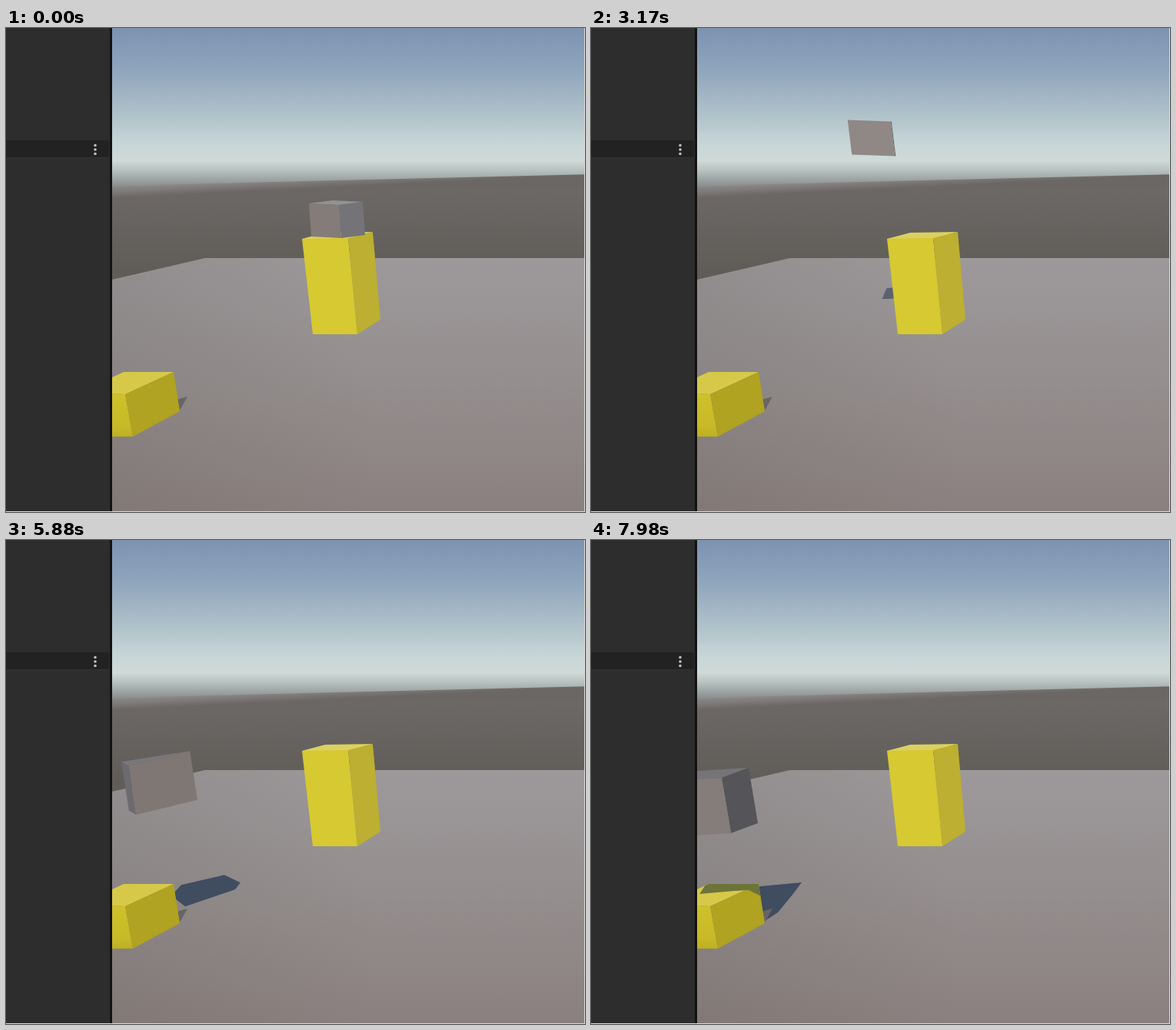
An HTML page with a canvas for the animation above (8 s loop, 753 px wide and 629 px high).

```html
<!DOCTYPE html>
<html>
<head>
<meta charset="utf-8">
<style>
html, body { margin: 0; width: 100%; height: 100%; overflow: hidden; background: #2d2d2d; }
canvas { display: block; }
</style>
</head>
<body>
<canvas id="stage" width="753" height="629"></canvas>
<script>
const ctx = document.getElementById('stage').getContext('2d');
const LOOP = 8000, GRAVITY = 0.00025;

// time, front corner x y, width vector, height vector, depth vector, shades: front side top
const poses = [
  [2650, 394, 228, 39, 2, 3, 43, 31, -4, 126, 117, 147],
  [3170, 334, 119.5, 56, 2, 5.5, 45, 1, 0, 138, 100, 130],
  [4140, 85, 288, 67, 0, 10, 53, 39, -9, 132, 105, 119],
  [4360, 15, 395, 70, 0, 10, 56, 30, -10, 132, 105, 119],
  [4800, 20, 440, 75, -12, 7, 58, -25, -7, 128, 108, 124],
  [5190, 176, 339, 75, -12, 7.5, 59, -25, -7, 128, 111, 126],
  [5950, 158, 302, 80, -20, 10, 64, -8, -5, 120, 108, 120],
  [6510, 86, 460, 85, -28, 12, 69, 0, 0, 108, 104, 115],
  [6600, 74, 490, 85, -26, 12, 70, 2, -1, 108, 100, 115],
  [7300, -20, 400, 80, -8, 11, 72, 32, -12, 122, 92, 116],
  [7980, 90, 314, 80, -5, 12, 72, 35, -13, 127, 86, 118]
];

const shift = (poly, dx, dy) => poly.map((v, i) => v + (i % 2 ? dy : dx));
const small = [379, 352, 382, 344, 385, 338, 401, 337, 400, 350, 390, 352];
const slanted = [152, 418, 180, 400, 202, 393, 245, 391, 238, 401, 206, 416];
const long = [204, 446, 217, 432, 273, 419, 294, 429, 287, 438, 222, 460];
const wide = [90, 577, 110, 520, 190, 495, 214, 506, 200, 524, 138, 555];
const pointed = [170, 470, 210, 451, 274, 445, 262, 461, 243, 484, 226, 495];
const shadows = [
  [2650, ...shift(small, 35, -15)],
  [3170, ...small],
  [4140, ...slanted],
  [4450, ...shift(slanted, -115, 38)],
  [4800, ...shift(long, -160, 35)],
  [5190, ...long],
  [5950, ...shift(long, 12, 18)],
  [6510, ...wide],
  [6850, ...shift(wide, -90, 5)],
  [7400, ...shift(pointed, -150, 30)],
  [7980, ...pointed]
];

function tween(keys, t) {
  t = Math.max(t, keys[0][0]);
  let i = 0;
  while (i < keys.length - 2 && t >= keys[i + 1][0]) i++;
  const a = keys[i], b = keys[i + 1];
  const f = Math.min(1, (t - a[0]) / (b[0] - a[0]));
  const mix = a.map((v, n) => v + (b[n] - v) * f);
  return { mix, arc: GRAVITY * (t - a[0]) * Math.max(0, b[0] - t) };
}

function trace(p) {
  ctx.beginPath();
  for (let i = 0; i < p.length; i += 2) ctx.lineTo(p[i], p[i + 1]);
  ctx.closePath();
}

function shape(p, fill) {
  trace(p);
  ctx.fillStyle = fill;
  ctx.fill();
}

function gradient(x0, y0, x1, y1, stops) {
  const g = ctx.createLinearGradient(x0, y0, x1, y1);
  stops.forEach(([at, color]) => g.addColorStop(at, color));
  return g;
}

const rect = (x, y, w, h, fill) => { ctx.fillStyle = fill; ctx.fillRect(x, y, w, h); };

const sky = gradient(0, 0, 0, 210, [
  [0, '#7d92b0'], [0.28, '#91a7be'], [0.55, '#b1c3ca'], [0.72, '#c8d6d7'],
  [0.82, '#cfdad8'], [0.88, '#b7c2c1'], [0.94, '#9ba3a2'], [1, '#858384']]);
const haze = gradient(138, 205, 138.4, 221, [
  [0, 'rgba(128,123,124,0)'], [0.45, '#827c7c'], [1, '#6b6765']]);
const land = gradient(0, 215, 0, 325, [[0, '#6b6866'], [1, '#5f5b56']]);
const floor = gradient(0, 299, 0, 629, [[0, '#9d999b'], [0.45, '#958f8f'], [1, '#8b807f']]);
const floorShade = gradient(138, 0, 480, 0, [[0, 'rgba(70,70,65,.13)'], [1, 'rgba(70,70,65,0)']]);
const blockFront = gradient(0, 475, 0, 531, [[0, '#cfc12a'], [0.75, '#c8ba27'], [1, '#bdaf20']]);

function background() {
  rect(138, 0, 615, 629, sky);
  shape([138, 219, 753, 203, 753, 330, 138, 330], land);
  ctx.save();
  ctx.transform(1, -0.024, 0, 1, 0, 138 * 0.024);
  rect(138, 205, 615, 15, haze);
  ctx.restore();
  const plane = [138, 327, 259, 299, 753, 299, 753, 629, 138, 629];
  shape(plane, floor);
  shape(plane, floorShade);
}

function pillar() {
  shape([385, 274, 415, 266, 477, 265, 445, 274], '#dbd15e');
  shape([385, 274, 445, 273, 457, 398, 399, 398], '#d6c931');
  shape([445, 273, 477, 265, 487, 379, 457, 398], '#bcaf31');
}

function block(t) {
  shape([138, 454, 153, 447, 218, 447, 155, 476, 138, 475], '#d6c949');
  shape([138, 475, 155, 476, 165, 531, 138, 531], blockFront);
  shape([155, 476, 218, 447, 226, 498, 165, 531], '#b0a321');
  ctx.save();
  trace([138, 454, 153, 447, 218, 447, 226, 498, 165, 531, 138, 531]);
  ctx.clip();
  if (t > 6000 && t < 7100) {
    const away = -Math.abs(t - 6510) * 0.25;
    shape(shift([60, 420, 140, 440, 178, 465, 212, 496, 216, 510, 165, 540, 60, 540], away, 0), '#62640f');
  }
  if (t > 7500) {
    const away = (t - 7980) * 0.22;
    shape(shift([141, 460, 150, 446, 219, 446, 221, 463, 205, 455, 186, 456], away, 0), '#6c7439');
  }
  ctx.restore();
}

const warm = v => `rgb(${v + 6},${v - 2},${v - 5})`;
const cool = v => `rgb(${v - 1},${v - 1},${v + 3})`;

function cube(t) {
  const { mix, arc } = tween(poses, t);
  const [, x, py, wx, wy, hx, hy, dx, dy, front, side, top] = mix;
  const y = py - arc;
  const at = (w, h, d) => [x + wx * w + hx * h + dx * d, y + wy * w + hy * h + dy * d];
  const edge = dx < 0 ? 0 : 1;
  const back = dx < 0 ? at(0.5, 0, 0.5) : at(1, 0, 1);
  shape([...at(0, 0, 0), ...at(1, 0, 0), ...back, ...at(0, 0, 1)], cool(top));
  shape([...at(edge, 0, 0), ...at(edge, 0, 1), ...at(edge, 1, 1), ...at(edge, 1, 0)], cool(side));
  shape([...at(0, 0, 0), ...at(1, 0, 0), ...at(1, 1, 0), ...at(0, 1, 0)], warm(front));
}

function panel() {
  rect(0, 0, 135, 629, '#2d2d2d');
  rect(0, 146, 134, 22, '#222222');
  rect(0, 168, 134, 1, '#333333');
  rect(135, 0, 3, 629, '#131313');
  ctx.fillStyle = '#c0c0c0';
  for (const y of [152.5, 158, 163.5]) {
    ctx.beginPath();
    ctx.arc(116, y, 1.8, 0, 7);
    ctx.fill();
  }
  rect(0, 628, 753, 1, '#d8d8d8');
  rect(752, 0, 1, 629, '#d8d8d8');
}

function draw(now) {
  const t = now % LOOP;
  background();
  if (t > 2650) {
    const dark = Math.min(1, Math.max(0.35, (t - 2900) / 1000));
    shape(tween(shadows, t).mix.slice(1), `rgba(56,70,92,${0.5 + dark * 0.4})`);
  }
  shape([222, 483, 236, 479, 226, 497], '#696465');
  pillar();
  block(t);
  cube(t);
  panel();
}

const start = performance.now();
function tick() {
  draw(performance.now() - start);
  requestAnimationFrame(tick);
}
tick();
</script>
</body>
</html>
```
